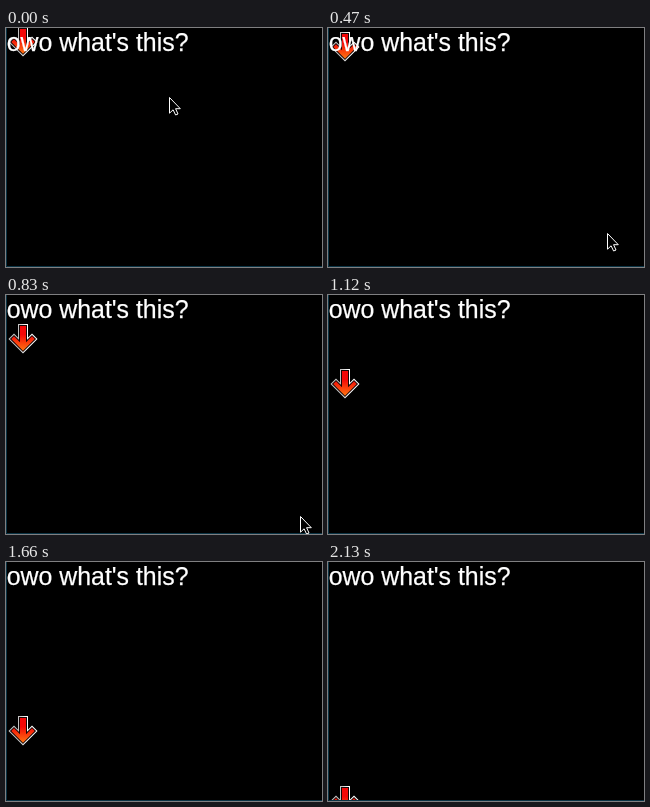
Write an HTML page that moves like this. It is 316x239 px and loops after 2.18 s.

```html
<!DOCTYPE html>
<html lang="en">
<head>
<meta charset="utf-8">
<title>Falling arrow</title>
<style>
  html, body { margin: 0; width: 100%; height: 100%; overflow: hidden; background: #000; }
  svg { display: block; width: 316px; height: 239px; }
  text { font: 24.9px "Liberation Sans", Arial, sans-serif; fill: #fff; stroke: #fff; stroke-width: 0.25px; }
</style>
</head>
<body>
<svg viewBox="0 0 316 239">
  <defs>
    <linearGradient id="fire" x1="0" y1="0" x2="0" y2="1">
      <stop offset="0.35" stop-color="#f40808"/>
      <stop offset="1" stop-color="#ff7410"/>
    </linearGradient>
    <linearGradient id="rim">
      <stop offset="0.35" stop-color="#c4c4c4"/>
      <stop offset="0.65" stop-color="#fff"/>
    </linearGradient>
    <path id="shape" d="M14 2H20V18.3L26 12.3 28.7 15 17 26.7 5.3 15 8 12.3 14 18.3Z"/>
  </defs>
  <rect width="316" height="239"/>
  <g id="arrow">
    <use href="#shape" stroke="url(#rim)" stroke-width="4"/>
    <use href="#shape" stroke="#160606" stroke-width="2"/>
    <use href="#shape" fill="url(#fire)"/>
  </g>
  <text x="0.7" y="23">owo what's this?</text>
  <path d="M.5 0V238.5H316" fill="none" stroke="#0a3344"/>
  <path id="cursor" d="M.5 .5V16.2L4.1 12.8 6.6 18 9 17 6.6 11.7H11.3Z" fill="#000" stroke="#fff"/>
</svg>
<script>
const LOOP = 2180;
const FALL_START = 640;
const FALL_TICK = 1000 / 30;
const arrow = document.getElementById("arrow");
const cursor = document.getElementById("cursor");

// The picture holds for 180 ms, then refreshes about every 60 ms.
const stepStart = k => k === 0 ? 0 : 120 + 60 * k - 10 * ((k >= 5) + (k >= 15) + (k >= 34));

function stepAt(time) {
  let k = 34;
  while (stepStart(k) > time) k--;
  return k;
}

function arrowTop(time) {
  if (time < 180) return -1;
  return 4 + 5 * Math.max(0, Math.floor((time - FALL_START) / FALL_TICK));
}

function cursorAt(step) {
  if (step <= 6) {
    const p = 1 - (1 - step / 6) ** 1.4;
    return [163 + 116 * p, 69 + 136 * p];
  }
  const p = Math.min(1, (step - 6) / 4);
  return [279 + 15 * p, 205 + 16 * p];
}

const place = (node, x, y) =>
  node.setAttribute("transform", `translate(${Math.round(x)} ${Math.round(y)})`);

function draw(time) {
  const step = stepAt(time);
  place(arrow, 0, arrowTop(stepStart(step)));
  place(cursor, ...cursorAt(step));
  cursor.setAttribute("visibility", step <= 12 ? "visible" : "hidden");
}

const origin = performance.now();
function tick() {
  draw((performance.now() - origin) % LOOP);
  requestAnimationFrame(tick);
}
tick();
</script>
</body>
</html>
```
